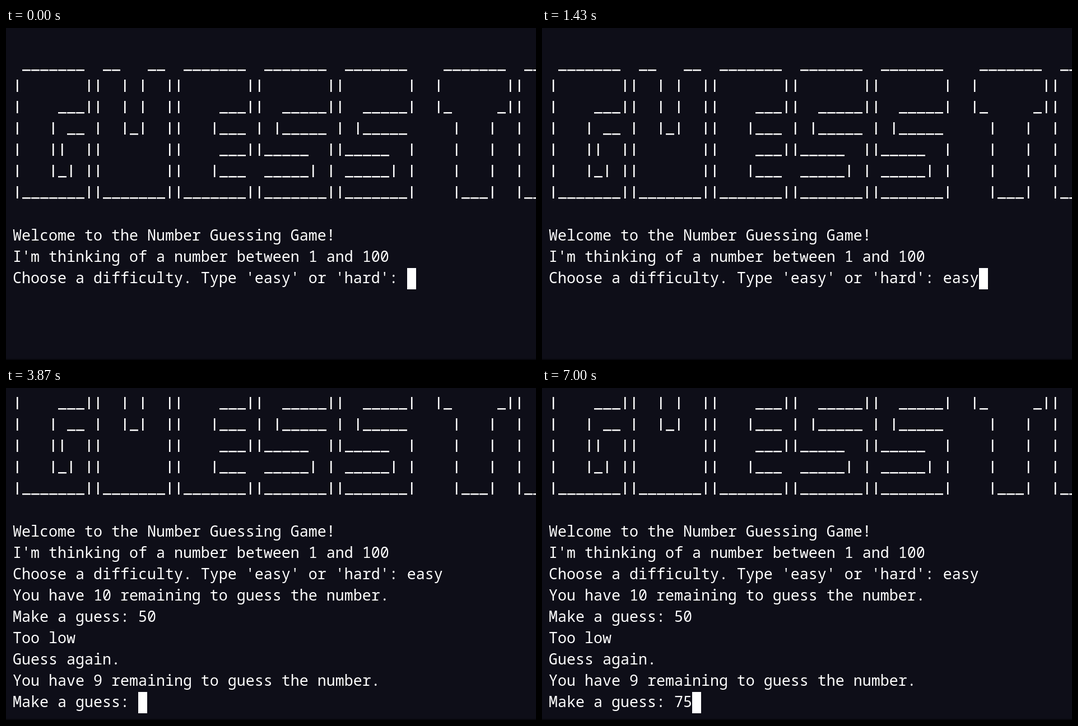
An HTML page with a canvas for the animation above (8000 ms loop, 946 by 592 pixels).

```html
<!DOCTYPE html>
<html lang="en">
<head>
<meta charset="utf-8">
<title>Number guessing game</title>
<style>
  html, body { margin: 0; width: 100%; height: 100%; overflow: hidden; background: #0e0e18; }
  canvas { display: block; }
</style>
</head>
<body>
<canvas id="stage" width="946" height="592"></canvas>
<script>
const ctx = document.getElementById('stage').getContext('2d');
const LOOP = 8000, CELL = 16, LINE = 38, LEFT = 12, TOP = 48;
const BG = '#0e0e18', FG = '#fff';

const banner = [
  ' _______  __   __  _______  _______  _______    _______  __',
  '|       ||  | |  ||       ||       ||       |  |       ||  ',
  '|    ___||  | |  ||    ___||  _____||  _____|  |_     _||  ',
  '|   | __ |  |_|  ||   |___ | |_____ | |_____     |   |  |  ',
  '|   ||  ||       ||    ___||_____  ||_____  |    |   |  |  ',
  '|   |_| ||       ||   |___  _____| | _____| |    |   |  |  ',
  '|_______||_______||_______||_______||_______|    |___|  |__'
];

// Terminal output: [time in ms, text appended]
const output = [
  [0, "Welcome to the Number Guessing Game!\nI'm thinking of a number between 1 and 100\n" +
      "Choose a difficulty. Type 'easy' or 'hard': "],
  [970, 'e'], [1130, 'a'], [1300, 's'], [1430, 'y'],
  [1730, '\nYou have 10 remaining to guess the number.\nMake a guess: '],
  [3030, '5'], [3230, '0'],
  [3870, '\nToo low\nGuess again.\nYou have 9 remaining to guess the number.\nMake a guess: '],
  [6770, '7'], [7000, '5']
];

function drawBanner(shift) {
  banner.forEach((row, r) => [...row].forEach((ch, c) => {
    const x = LEFT + c * CELL, y = TOP + (r - shift) * LINE;
    if (y < 0) return;
    if (ch === '|') ctx.fillRect(x + 7, y + 6, 2.5, 22);
    if (ch === '_') ctx.fillRect(x + 1, y + 26, 15, 2.5);
  }));
}

function drawPointer(t) {
  if (t < 70 || t >= 970) return;
  const p = Math.min(1, (t - 70) / 530), ease = 1 - (1 - p) ** 2;
  ctx.save();
  ctx.translate(846 - 40 * ease, 272 * ease);
  ctx.beginPath();
  for (const s of [-1, 1]) {
    ctx.moveTo(-6.5, 16 * s);
    ctx.quadraticCurveTo(0, 16 * s, 0, 11 * s);
    ctx.quadraticCurveTo(0, 16 * s, 6.5, 16 * s);
  }
  ctx.moveTo(0, -12);
  ctx.lineTo(0, 12);
  ctx.lineCap = 'round';
  for (const [color, width] of [[FG, 5], [BG, 2]]) {
    ctx.strokeStyle = color;
    ctx.lineWidth = width;
    ctx.stroke();
  }
  ctx.restore();
}

function draw(t) {
  const lines = output.filter(([at]) => t >= at).map(([, s]) => s).join('').split('\n');
  const shift = Math.max(0, lines.length - 6);
  const rowTop = i => TOP + (8 + i - shift) * LINE;

  ctx.fillStyle = BG;
  ctx.fillRect(0, 0, 946, 592);
  ctx.fillStyle = '#07070d';
  ctx.fillRect(0, 590, 946, 2);

  ctx.fillStyle = FG;
  drawBanner(shift);
  ctx.font = '26.667px "Noto Sans Mono", "DejaVu Sans Mono", monospace';
  lines.forEach((s, i) => ctx.fillText(s, LEFT, rowTop(i) + 27));

  const last = lines.length - 1;
  ctx.fillRect(LEFT + lines[last].length * CELL, rowTop(last), CELL, LINE);
  drawPointer(t);
}

const start = performance.now();
function frame() {
  draw((performance.now() - start) % LOOP);
  requestAnimationFrame(frame);
}
frame();
</script>
</body>
</html>
```
